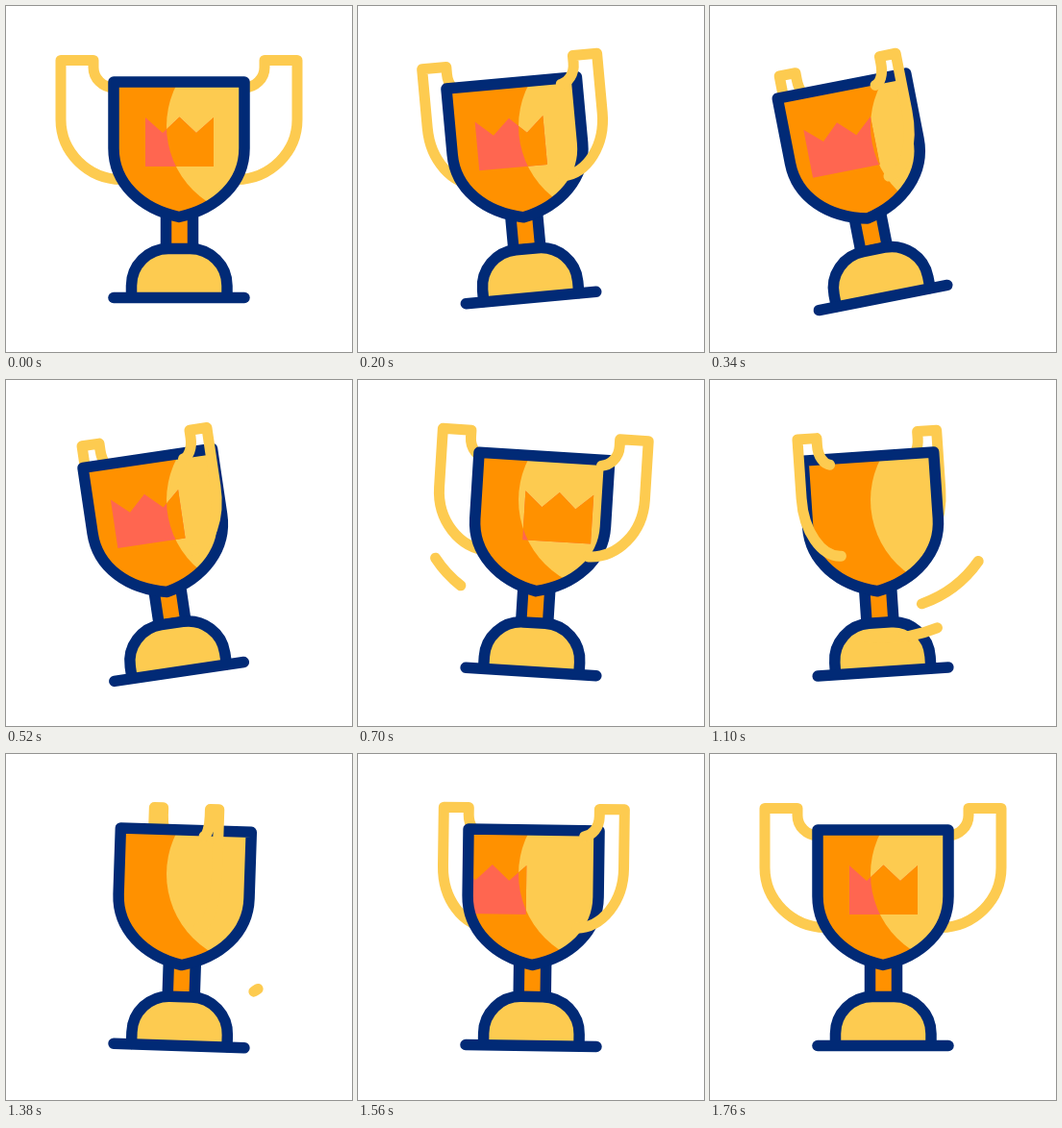
These frames come from a looping animation (360x360 px, 2400 ms). An HTML page:

```html
<!DOCTYPE html>
<html lang="en">
<head>
<meta charset="utf-8">
<title>Trophy</title>
<style>
  html, body { margin: 0; width: 100%; height: 100%; overflow: hidden; background: #fff; }
  svg { display: block; width: 360px; height: 360px; }
  .outline { stroke: #012a76; stroke-width: 11.5; }
  .ribbon { fill: none; stroke: #fdcb50; stroke-width: 11; }
  .orange { fill: #ff9100; }
  .yellow { fill: #fdcb50; }
  .red { fill: #ff6650; }
</style>
</head>
<body>
<svg viewBox="0 0 360 360" stroke-linecap="round" stroke-linejoin="round">
  <defs>
    <path id="cup" d="M112 79H248V148C248 184 220 211 180 219.5C140 211 112 184 112 148Z"/>
    <path id="crown" d="M145 116L163 132L180.500 115.500L198 132L216 116V167H145Z"/>
    <circle id="glow" cx="261" cy="125" r="94"/>
    <clipPath id="inCup"><use href="#cup" class="tilt"/></clipPath>
    <clipPath id="inGlow"><use href="#glow"/></clipPath>
  </defs>

  <g class="tilt">
    <path id="back" class="ribbon"/>
    <path class="outline orange" d="M166.500 215H194.500V253H166.500Z"/>
    <path class="outline yellow" d="M130.500 303V291A38.500 38.500 0 0 1 169 252.500H191.500A38.500 38.500 0 0 1 230 291V303"/>
    <path class="outline" d="M112 303.500H248"/>
  </g>

  <!-- The glow stays upright while the cup tilts around it. -->
  <g clip-path="url(#inCup)">
    <rect class="orange" width="360" height="360"/>
    <use href="#glow" class="yellow"/>
    <use href="#crown" class="red crown"/>
    <g clip-path="url(#inGlow)"><use href="#crown" class="orange crown"/></g>
  </g>

  <g class="tilt">
    <use href="#cup" class="outline" fill="none"/>
    <path id="front" class="ribbon"/>
  </g>
  <path id="swooshUpper" class="ribbon"/>
  <path id="swooshLower" class="ribbon"/>
</svg>
<script>
const LOOP = 2400, END = 1760, TURN = 830, AXIS = 180;

const TILT = [[30, 0], [405, -12], [840, 8.5], [1160, -5.1], [1400, 2], [1680, 0]];
const SPIN = [[0, 1], [420, 0.45], [TURN, 1], [END, -1]];
const CROWN_OUT = [[0, 0], [420, -14], [1400, 145]];
const CROWN_IN = [[1300, -108], [END, 0]];

const byId = id => document.getElementById(id);
const setAll = (selector, name, value) =>
  document.querySelectorAll(selector).forEach(el => el.setAttribute(name, value));
const progress = (t, from, to) => Math.min(1, Math.max(0, (t - from) / (to - from)));
const ease = p => p * p * (3 - 2 * p);

function track(keys, t) {
  let value = keys[0][1];
  for (let i = 1; i < keys.length; i++) {
    const [from, a] = keys[i - 1], [to, b] = keys[i];
    if (t >= from) value = a + (b - a) * ease(progress(t, from, to));
  }
  return value;
}

// side: -1 for left, 1 for right, multiplied by the horizontal foreshortening.
function handle(side) {
  const x = offset => (AXIS + side * offset).toFixed(2);
  return `M${x(69)} 85C${x(79)} 84 ${x(89)} 76 ${x(89)} 64V56.5H${x(123)}V118` +
    `C${x(123)} 152 ${x(95)} 180 ${x(60)} 180.500`;
}

// Part of an arc running from lower left to lower right under the cup.
function swoosh(id, radius, start, end, tail, head) {
  const point = p => {
    const a = (start + (end - start) * p) * Math.PI / 180;
    return `${(181 + radius * Math.cos(a)).toFixed(2)} ${(119.5 + radius * Math.sin(a)).toFixed(2)}`;
  };
  const d = head > tail ? `M${point(tail)}A${radius} ${radius} 0 0 0 ${point(head)}` : '';
  byId(id).setAttribute('d', d);
}

function draw(t) {
  const tilt = `rotate(${track(TILT, t).toFixed(3)} ${AXIS} 303)`;
  setAll('.tilt', 'transform', tilt);

  const shift = track(t < 1300 ? CROWN_OUT : CROWN_IN, t);
  setAll('.crown', 'transform', `${tilt} translate(${shift.toFixed(2)} 0)`);

  const width = track(SPIN, t);
  const spinning = t >= 20 && t < END;
  const near = handle(t < TURN ? width : -width);
  const far = handle(t < TURN ? -width : width);
  byId('back').setAttribute('d', spinning ? far : far + near);
  byId('front').setAttribute('d', spinning ? near : '');

  swoosh('swooshUpper', 120, 147, 33, progress(t, 700, 1300), progress(t, 620, 1110));
  swoosh('swooshLower', 149, 123, 57, progress(t, 920, 1395), progress(t, 860, 1150));
}

const began = performance.now();
function tick() {
  draw((performance.now() - began) % LOOP);
  requestAnimationFrame(tick);
}
tick();
</script>
</body>
</html>
```
